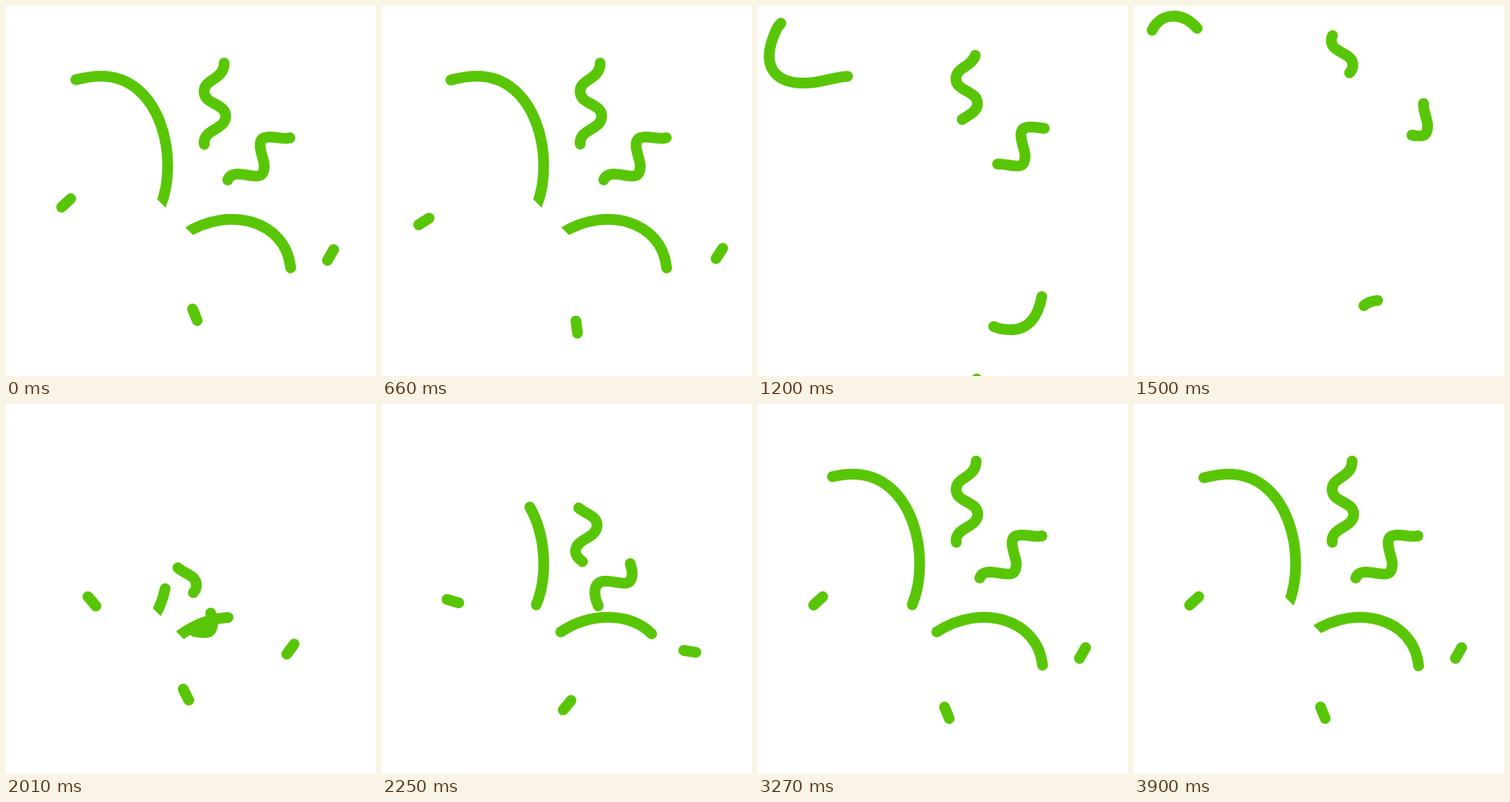
Recreate the animation shown at these times as an HTML page. Size 480 px wide and 480 px high, loop 3.93 s.

```html
<!DOCTYPE html>
<html lang="en">
<head>
<meta charset="utf-8">
<title>Confetti</title>
<style>
  html, body { margin: 0; width: 100%; height: 100%; overflow: hidden; background: #fff; }
  svg { display: block; width: 100vw; height: 100vh; }
  .ribbon { fill: none; stroke: #58c606; stroke-width: 14; stroke-linecap: round; }
</style>
</head>
<body>
<svg id="stage" viewBox="0 0 480 480"></svg>
<script>
const LOOP = 3930, STEP = 30;
const THROW = 610, GONE = 1740, FIRST = 2010;
const stage = document.getElementById('stage');

function add(tag, attrs) {
  const node = document.createElementNS('http://www.w3.org/2000/svg', tag);
  set(node, attrs);
  return stage.appendChild(node);
}

function set(node, attrs) {
  for (const name in attrs) node.setAttribute(name, attrs[name]);
}

const mix = (a, b, s) => a + (b - a) * s;
const ramp = (from, to, t) => Math.min(1, Math.max(0, (t - from) / (to - from)));
const smooth = (from, to, t) => {
  const s = ramp(from, to, t);
  return s * s * (3 - 2 * s);
};
// Share of the way still to go: 1 at FIRST, 0 at end, more than 1 before.
const remaining = (end, power, t) => Math.max(0, (end - t) / (end - FIRST)) ** power;

// Shows only the stretch of a path between two distances.
function trim(node, tail, head, total) {
  set(node, {
    display: head - tail < 1 ? 'none' : 'inline',
    'stroke-dasharray': `${head - tail} ${total + 50}`,
    'stroke-dashoffset': -tail
  });
}

// A long curve that grows out of the popper and later slips away along itself.
function streamer({ d, tail, head, born, pace, end }) {
  const node = add('path', { class: 'ribbon', d });
  const total = node.getTotalLength();
  return t => {
    if (t < GONE) {
      trim(node, mix(tail, total, smooth(THROW, end, t)),
        mix(head, total, smooth(675, 1500, t)), total);
    } else {
      trim(node, tail * smooth(FIRST, 2250, t),
        head * (1 - Math.exp(-Math.max(0, t - born) / pace)), total);
    }
  };
}

// A wavy piece that flies as well as crawling along its own curve.
function squiggle({ d, tail, enter, leave }) {
  const node = add('path', { class: 'ribbon', d });
  const total = node.getTotalLength();
  return t => {
    let a, b, move, far;
    if (t < GONE) {
      far = ramp(900, GONE, t) ** 2;
      move = leave;
      a = mix(tail, 70, ramp(THROW, GONE, t) ** 1.7);
      b = mix(mix(157, 160, ramp(THROW, 900, t)), 70, far);
    } else {
      far = remaining(2530, 3, t);
      move = enter;
      a = mix(mix(52, 0, smooth(FIRST, 2250, t)), tail, smooth(2250, 2750, t));
      b = mix(mix(52, 97, smooth(1880, FIRST, t)), 157, smooth(2250, 2750, t));
    }
    trim(node, a, b, total);
    set(node, { transform: `translate(${move[0] * far} ${move[1] * far})` });
  };
}

// A short loose piece that spins on its way in and out.
function dash({ x, y, angle, enter, spinIn, leave, spinOut }) {
  const node = add('path', { class: 'ribbon' });
  return t => {
    const leaving = t < GONE;
    const s = Math.max(0, (t - THROW) / 290);
    const far = leaving ? s ** 0.7 : remaining(2960, 3, t);
    const move = leaving ? leave : enter;
    const turn = leaving ? angle + spinOut * s : angle - spinIn * remaining(3050, 1.7, t);
    const half = leaving ? 8 : 8 * ramp(GONE, 1900, t);
    set(node, {
      d: `M${-half} 0H${half}`,
      transform: `translate(${x + move[0] * far} ${y + move[1] * far}) rotate(${turn})`
    });
  };
}

// White rim that slides over the inner ends of the two streamers.
function rim() {
  const node = add('path', { fill: '#fff' });
  return t => {
    const low = t < 1000 ? 0 : 20 * (1 - ramp(3300, 3900, t));
    set(node, { d: 'M185 239.5L255 309.5V335H185Z', transform: `translate(0 ${low})` });
  };
}

const parts = [
  streamer({
    d: 'M194 273C229 213 206 91 123 91C96 91 83 101 57 100C20 99 4 76 22 35C32 8 62 6 82 29',
    tail: 14, head: 264, born: 1956, pace: 370, end: 1800
  }),
  streamer({
    d: 'M227 299C285 257 362 277 369 338C373 372 366 420 328 420C284 420 284 384 316 382',
    tail: 6, head: 180, born: 1887, pace: 270, end: 1650
  }),
  squiggle({
    d: 'M266 190Q257 184 257 177C257 160 285 160 285 143S257 128 257 111S283 96 283 74',
    tail: 14, enter: [-38, 92], leave: [-2, -130]
  }),
  squiggle({
    d: 'M291 250C284 234 284 218 301 218C318 218 335 229 335 207C335 196 319 170 342 170C356 170 367 176 377 166',
    tail: 25, enter: [-67, 76], leave: [90, -102]
  }),
  dash({ x: 78, y: 255.5, angle: -43, enter: [33.5, 0.5], spinIn: -92, leave: [-81, 82], spinOut: 63 }),
  dash({ x: 421, y: 323, angle: 120, enter: [-52, -5], spinIn: 174, leave: [57, -7], spinOut: 19 }),
  dash({ x: 245, y: 400.5, angle: 248, enter: [-11.5, -23.5], spinIn: 185, leave: [26, 55], spinOut: 85 }),
  rim()
];

const start = performance.now();
function frame() {
  const now = (performance.now() - start) % LOOP;
  const t = Math.floor(now / STEP) * STEP;
  // The first and last moments share one resting pose.
  const pose = t < 630 ? LOOP - STEP : t;
  parts.forEach(update => update(pose));
  requestAnimationFrame(frame);
}
frame();
</script>
</body>
</html>
```
